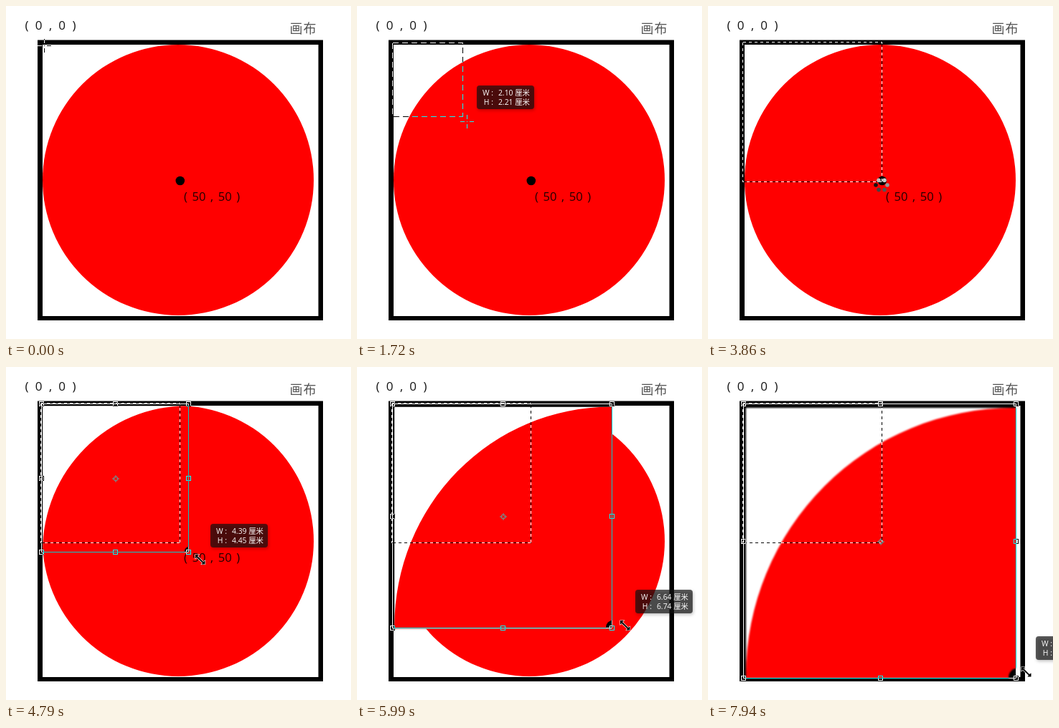
An HTML page for the animation above (8000 ms loop, 481 by 465 pixels).

```html
<!DOCTYPE html>
<html lang="zh">
<head>
<meta charset="utf-8">
<title>Circle transform</title>
<style>
  html, body { margin: 0; width: 100%; height: 100%; overflow: hidden; background: #fff; }
  svg { display: block; width: 481px; height: 465px; isolation: isolate; }
  text { font-family: "Open Sans", "Noto Sans CJK SC", sans-serif; }
  .soft { filter: blur(.45px); }
  .label { font-size: 17px; word-spacing: 4.9px; fill: #151515; }
  .center { font-size: 16.6px; word-spacing: 2.3px; fill: #200; }
  .title { font: 500 18px "Noto Sans CJK SC", sans-serif; letter-spacing: 1px; fill: #555; }
  #tip text { font-size: 10.4px; fill: #fff; text-anchor: end; }
  #tip rect { filter: drop-shadow(1px 2px 2px rgba(0, 0, 0, .35)); }
  .line { fill: none; stroke: #fff; shape-rendering: crispEdges; }
  .invert { mix-blend-mode: difference; }
</style>
</head>
<body>
<svg viewBox="0 0 481 465">
  <defs>
    <clipPath id="cut"><path d="M49 51H242V245H49z"/></clipPath>
    <path id="edges" d="M48.5 50.5H242.5V245.5M48.5 50.5V245.5H242.5"/>
    <g id="scene">
      <path fill="#fff" d="M0 0H481V465H0z"/>
      <g class="soft">
        <path d="M44 47.5H442V439H44zM51 54V433H435.5V54z" fill-rule="evenodd"/>
        <circle cx="240" cy="243" r="189" fill="#f00"/>
        <circle cx="242.8" cy="244" r="6.3"/>
      </g>
      <text class="label" x="26.5" y="32.5">( 0 , 0 )</text>
      <text class="title" x="395.5" y="38">画布</text>
      <text class="center" x="248" y="272">( 50 , 50 )</text>
    </g>
  </defs>

  <use href="#scene"/>
  <g id="piece"><g clip-path="url(#cut)"><use href="#scene"/></g></g>

  <path id="drag" class="line invert" stroke-dasharray="8 5"/>
  <g id="ants">
    <use href="#edges" class="line" style="stroke:#000"/>
    <use href="#edges" class="line" stroke-dasharray="4 4"/>
  </g>
  <path id="box" class="line invert"/>
  <path id="pivot" class="line invert" style="stroke:#999;shape-rendering:auto"
        d="M-3 0a3 3 0 1 0 6 0a3 3 0 1 0 -6 0M-5 0h4M1 0h4M0 -5v4M0 1v4"/>

  <g id="tip">
    <rect width="80" height="33" rx="4" fill="#111" fill-opacity=".68"/>
    <text x="23" y="14">W :</text><text id="wide" x="74" y="14"></text>
    <text x="23" y="27">H :</text><text id="high" x="74" y="27"></text>
  </g>

  <path id="cross" class="line invert" d="M-9 .5h6M4 .5h6M.5 -9v6M.5 4v6M0 .5h1"/>
  <g id="arrow">
    <path d="M.5 .5V13l3-3 2.5 5 2-1-2.5-5h4z" fill="#fff" stroke="#000"/>
    <path d="M9.5 12.5h7v6h-7z" fill="#fff" stroke="#000" stroke-dasharray="2 1"/>
  </g>
  <g id="spinner"></g>
  <path id="resize" stroke="#fff" stroke-width="1.2" paint-order="stroke"
        d="M-7 -7h5l-2 2L4 3 6.5 1.5V6.5H1.5L3 4.5 -5 -3 -7 -1.5z"/>
</svg>

<script>
const $ = id => document.getElementById(id);
const LOOP = 8000, LEFT = 49, TOP = 51, WIDTH = 193, HEIGHT = 194;
const PRESS = 850, RELEASE = 3210, SELECTED = 3400, NUDGE = 3680, BUSY = 3860;
const TRANSFORM = 4020, GRAB = 4480, PULLED = 5300;
const LAG = 50, STEP = 80, PHASE = 20;

// Time, width and height of the dragged area.
const sizes = [
  [800, 4, 4], [1140, 23, 26], [2260, 172, 179.8], [2830, WIDTH, HEIGHT],
  [GRAB, WIDTH, HEIGHT], [PULLED, 233, 237], [PULLED + LAG, 254, 266],
  [6580, 364, 367], [7400, 381, 384]
];

const clamp = p => Math.min(1, Math.max(0, p));
const mix = (a, b, p) => a + (b - a) * p;

function sizeAt(t) {
  const i = sizes.findIndex(s => s[0] > t);
  if (i <= 0) return sizes.at(i).slice(1);
  const [t0, w0, h0] = sizes[i - 1], [t1, w1, h1] = sizes[i];
  const p = (t - t0) / (t1 - t0);
  return [mix(w0, w1, p), mix(h0, h1, p)];
}

// The pointer runs ahead of the redrawn outline.
function pointerAt(t) {
  const [w, h] = sizeAt(t + LAG);
  const resizing = t >= TRANSFORM;
  const dx = resizing ? 14 : 0;
  const dy = resizing ? mix(16, -9, clamp((t - GRAB) / (PULLED - GRAB))) : t >= NUDGE ? 4 : 0;
  return [LEFT + w + dx, TOP + h + dy];
}

const show = (id, on) => { $(id).style.display = on ? '' : 'none'; };
const move = (id, x, y) =>
  $(id).setAttribute('transform', `translate(${Math.round(x)} ${Math.round(y)})`);
const path = (id, d) => $(id).setAttribute('d', d);

const shades = ['#999', '#555', '#444', '#111', '#bbb', '#ccc'];
$('spinner').innerHTML = shades.map((fill, i) => {
  const a = i * Math.PI / 3;
  return `<circle cx="${8 * Math.cos(a)}" cy="${1 + 7.6 * Math.sin(a)}" r="2.8" fill="${fill}"/>`;
}).join('');

function drawTransform(w, h) {
  const l = LEFT + .5, u = TOP + .5;
  const r = l + Math.round(w) - 1, b = u + Math.round(h) - 1;
  const mx = Math.round((l + r) / 2) + .5, my = Math.round((u + b) / 2) + .5;
  let d = `M${l} ${u}H${r}V${b}H${l}z`;
  for (const x of [l, mx, r]) for (const y of [u, my, b])
    if (x !== mx || y !== my) d += `M${x - 3} ${y - 3}h6v6h-6z`;
  path('box', d);
  move('pivot', mx, my);
  $('piece').setAttribute('transform', `translate(${LEFT} ${TOP}) ` +
    `scale(${w / WIDTH} ${h / HEIGHT}) translate(${-LEFT} ${-TOP})`);
}

function drawDrag(w, h) {
  const l = LEFT + .5, u = TOP + .5, r = l + Math.round(w), b = u + Math.round(h);
  path('drag', `M${l} ${u}H${r}V${b}M${l} ${u}V${b}H${r}`);
}

function draw(t) {
  const step = Math.floor((t - PHASE) / STEP) * STEP + PHASE;
  const [w, h] = sizeAt(step);
  const [px, py] = pointerAt(step);
  const dragging = t >= PRESS && t < SELECTED, transforming = t >= TRANSFORM;

  for (const id of ['piece', 'box', 'pivot']) show(id, transforming);
  show('drag', dragging);
  show('ants', t >= SELECTED);
  if (dragging) drawDrag(w, h);
  if (transforming) drawTransform(w, h);

  // Centimetres; resizing keeps the proportions fixed.
  const high = h / 46.66, wide = transforming ? high * .986 : w / 46.5;
  show('tip', t >= PRESS && t < RELEASE || t >= GRAB);
  move('tip', px + 13.4, py - 50);
  $('wide').textContent = wide.toFixed(2) + ' 厘米';
  $('high').textContent = high.toFixed(2) + ' 厘米';

  const pointer = t < RELEASE ? 'cross' : t < BUSY ? 'arrow' : transforming ? 'resize' : 'spinner';
  for (const id of ['cross', 'arrow', 'spinner', 'resize']) show(id, id === pointer);
  move(pointer, px, py);
}

const start = performance.now();
function tick() {
  draw((performance.now() - start) % LOOP);
  requestAnimationFrame(tick);
}
tick();
</script>
</body>
</html>
```
